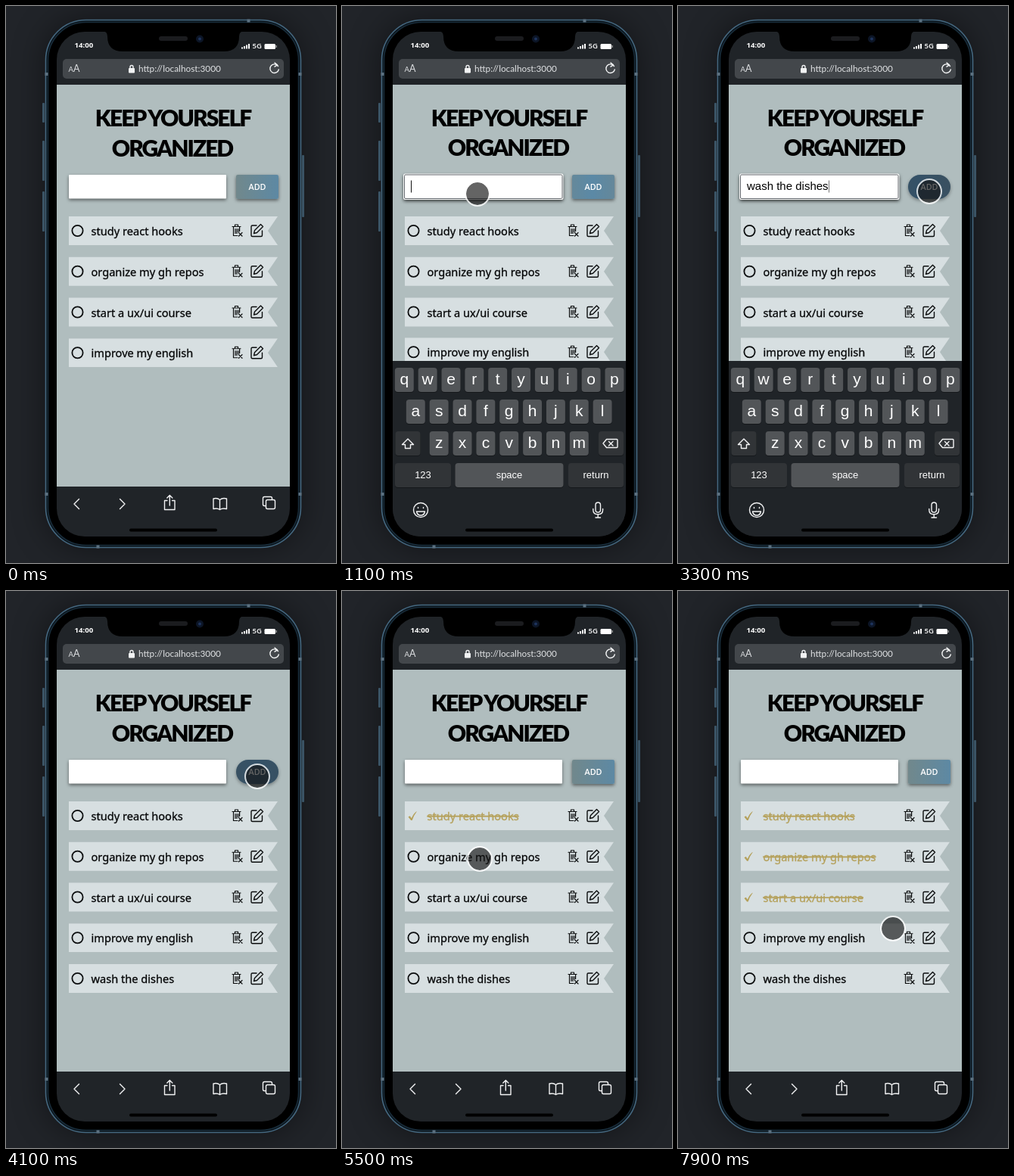
These frames come from a looping animation (436x736 px, 8000 ms). An HTML page:

```html
<!DOCTYPE html>
<html lang="en">
<head>
<meta charset="utf-8">
<title>To-do list on a phone</title>
<style>
html, body { margin: 0; width: 100%; height: 100%; overflow: hidden; background: #212429; }
#stage { position: absolute; left: 0; top: 0; width: 436px; height: 736px; overflow: hidden; }
svg { position: absolute; left: 0; top: 0; }
.line { fill: none; stroke: #f2f3f4; stroke-width: 1.4; stroke-linecap: round; stroke-linejoin: round; }
.ink { fill: none; stroke: #0b0d0e; stroke-linecap: round; stroke-linejoin: round; }
.glow { filter: drop-shadow(0 0 22px rgba(0, 0, 0, .45)); }
.title { font: 900 30px Lato, "Open Sans", sans-serif; letter-spacing: -2px; text-anchor: middle; }
.item { font: 400 14.6px "Noto Sans", sans-serif; fill: #060708; stroke: #060708; stroke-width: .3; }
.done .item { fill: #b4a05a; stroke: #b4a05a; text-decoration: line-through; }
.status { font: 700 9.6px "Open Sans", sans-serif; fill: #fff; }
.url { font: 11.8px Lato, sans-serif; fill: #dfe1e3; }
.typed { font: 15px "Liberation Sans", Arial, sans-serif; }
.key { font: 21px "Liberation Sans", Arial, sans-serif; fill: #fff; text-anchor: middle; }
.word { font-size: 13px; }
.field { filter: drop-shadow(0 2px 2px rgba(0, 0, 0, .5)); }

.nudge { animation: nudge 8s step-end infinite; }
.focus { animation: focus 8s step-end infinite; }
#keys { animation: slide 8s linear infinite; }
#add {
  position: absolute; left: 304px; top: 223px; width: 56px; height: 32px;
  font: 600 10.8px/32px "Open Sans", sans-serif; color: #fff; text-align: center;
  background: linear-gradient(90deg, #71888c, #5b89a6, #6f868c) 0 0 / 220% 100%;
  animation: hue 8s ease-in-out infinite, hover 8s ease-in-out infinite;
}
#pointer {
  position: absolute; left: -17px; top: -17px; width: 30px; height: 30px;
  border: 2px solid rgba(255, 255, 255, .78); border-radius: 50%;
  background: rgba(20, 20, 20, .66); background-clip: padding-box;
  animation: move 8s ease-in-out infinite, show 8s step-end infinite;
}

@keyframes nudge { 0% { transform: none } 7.5% { transform: translateY(-1px) } 46% { transform: none } }
@keyframes focus { 0% { opacity: 0 } 7.5% { opacity: 1 } 45% { opacity: 0 } }
@keyframes slide {
  0%, 7.49% { transform: translateY(236px) }
  7.5% { transform: translateY(9px) }
  9%, 45% { transform: none; animation-timing-function: ease-in }
  48.75%, 100% { transform: translateY(236px) }
}
@keyframes hue {
  0%, 100% { background-position: 0 0 }
  7.5% { background-position: 40% 0 }
  26% { background-position: 90% 0 }
  42% { background-position: 70% 0 }
  66% { background-position: 0 0 }
}
@keyframes hover {
  0%, 38.5%, 55%, 100% { border-radius: 2px; box-shadow: 0 2px 4px rgba(0, 0, 0, .5), inset 0 0 0 30px rgba(25, 42, 60, 0) }
  41%, 51.5% { border-radius: 16px; box-shadow: 0 2px 4px rgba(0, 0, 0, .35), inset 0 0 0 30px rgba(25, 42, 60, .58) }
}
@keyframes move {
  0%, 1.25% { transform: translate(186px, 330px) }
  5%, 17.5% { transform: translate(179px, 248px) }
  17.51%, 33.75% { transform: translate(182px, 248px); animation-timing-function: ease-in }
  36.25% { transform: translate(254px, 268px); animation-timing-function: ease-out }
  38.75%, 51.25% { transform: translate(332px, 245px) }
  56.25%, 62.5% { transform: translate(182px, 300px) }
  68.75%, 77.5% { transform: translate(182px, 354px) }
  81.25%, 93.75% { transform: translate(182px, 406px) }
  98.75%, 100% { transform: translate(284px, 446px) }
}
@keyframes show { 0% { opacity: 0 } 1.25% { opacity: 1 } 17.5% { opacity: 0 } 33.75%, 100% { opacity: 1 } }
</style>
</head>
<body>
<div id="stage">
<svg width="436" height="736" viewBox="0 0 436 736">
  <defs>
    <clipPath id="screen"><rect x="67" y="34" width="308" height="667" rx="37"/></clipPath>
    <clipPath id="inner"><rect x="85" y="225" width="205" height="28"/></clipPath>
    <g id="icons" class="ink">
      <path stroke-width="1.2" d="M299 13.5h11M302.5 13v-2h4v2M300.5 14v11.5h5.5M308.6 14v5.5M303 16.5v6M305 16.5v6M307 16.5v4M307.5 21.5l4.5 4.5m0-4.5l-4.5 4.5"/>
      <path stroke-width="1.4" d="M331 12h-6q-1.600-1.600 1.600v11.500q0 1.500 1.500 1.500h11.500q1.500 0 1.500-1.500v-6" visibility="hidden"/>
      <path stroke-width="1.4" d="M331 12H325.500Q324 12 324 13.500V25Q324 26.500 325.500 26.500H337Q338.500 26.500 338.500 25V19M336.500 10.500L339.500 13.500L331.500 21.500L327.500 22.500L328.500 18.500Z"/>
    </g>
  </defs>

  <!-- phone body -->
  <g fill="#4a6a80">
    <rect x="48" y="128" width="3" height="26" rx="1"/>
    <rect x="48" y="178" width="3" height="53" rx="1"/>
    <rect x="48" y="245" width="3" height="53" rx="1"/>
    <rect x="391" y="197" width="3" height="82" rx="1"/>
  </g>
  <rect class="glow" x="52.500" y="18.500" width="337" height="697" rx="53" fill="#0b141b" stroke="#456880" stroke-width="1.600"/>
  <rect x="55.500" y="21.500" width="331" height="691" rx="50" stroke="#182c3a" stroke-width="1.500"/>
  <path d="M51.500 90h4M386.500 90h4M51.500 645h4M386.500 645h4M320.500 17.500v4M121.500 712.500v4" stroke="#5c7180" stroke-width="4"/>

  <g clip-path="url(#screen)">
    <rect x="67" y="34" width="308" height="667" fill="#202428"/>
    <rect x="67" y="104" width="308" height="531" fill="#b0bdbe"/>

    <!-- address bar -->
    <rect x="75" y="70" width="292" height="26" rx="5" fill="#43474b"/>
    <text class="url" x="82.500" y="87" style="font-size:9.500px">A</text>
    <text class="url" x="89" y="87" style="font-size:12.500px">A</text>
    <rect x="162" y="82" width="8" height="6.500" rx="1" fill="#f2f3f4"/>
    <path class="line" d="M164 82v-1.500a2 2 0 0 1 4 0V82"/>
    <text class="url" x="175" y="87.300">http://localhost:3000</text>
    <path class="line" d="M359.500 79.500A5.800 5.800 0 1 0 360.300 84M355 75l3.500 2.800l-3.500 2.400"/>

    <!-- status bar -->
    <text class="status" x="90.500" y="55.300">14:00</text>
    <text class="status" x="325.500" y="56.300" style="font-weight:600">5G</text>
    <path d="M312 56.500v-2M315 56.500v-3.500M318 56.500v-5M321 56.500v-6.500" stroke="#fff" stroke-width="2"/>
    <rect x="341.500" y="50" width="14.500" height="7" rx="1.500" fill="#fff"/>
    <rect x="356.600" y="52" width="1.200" height="3" fill="#aaa"/>

    <!-- page -->
    <text class="title" x="220.500" y="158.500">KEEP YOURSELF</text>
    <text class="title nudge" x="219.500" y="198.500">ORGANIZED</text>
    <rect class="field" x="83" y="223" width="208" height="31.500" rx="1" fill="#fff"/>
    <g class="focus">
      <rect class="field" x="81" y="221.500" width="211.500" height="34.500" rx="2.500" fill="#fff"/>
      <rect x="82.500" y="223" width="208.500" height="31.500" rx="1.500" fill="none" stroke="#60656a"/>
      <g clip-path="url(#inner)">
        <text class="typed" id="typed" x="91" y="243">wash the dishes</text>
        <g id="cover">
          <rect x="91" y="226" width="210" height="26" fill="#fff"/>
          <rect x="91" y="230.500" width="1" height="16" fill="#111"/>
        </g>
      </g>
    </g>
    <g id="rows"></g>

    <!-- toolbar -->
    <path class="line" d="M96.500 651.500l-6.500 6.500l6.500 6.500M150.500 651.500l6.500 6.500l-6.500 6.500
      M213 653.500h-3.500v12h13.500v-12h-3.500M216.300 660v-13.500m-3.500 3.500l3.500-3.500l3.500 3.500
      M282.500 652.500q-3.500-3-8.500-1.500v13.500q5-1.500 8.500 1q3.500-2.500 9-1v-13.500q-5.500-1.500-9 1.500v13
      M343 660.500h-1.500q-2 0-2-2v-8q0-2 2-2h8q2 0 2 2v1.500"/>
    <rect class="line" x="343.500" y="652.500" width="12" height="12" rx="2"/>

    <g id="keys">
      <rect x="67" y="469" width="308" height="240" fill="#202428"/>
      <g class="line">
        <path d="M87 572l7.500 7.500h-4v5h-7v-5h-4zM349.500 572.500h13.500q1 0 1 1v9q0 1-1 1h-13.500l-4.500-5.500zM352.500 575.500l5.500 5.500m0-5.500l-5.500 5.500"/>
        <circle cx="104" cy="666" r="9.500"/>
        <path d="M98.500 668h11q-1 5-5.500 5t-5.500-5zM100.500 662.500v1M107.500 662.500v1"/>
        <rect x="335" y="656" width="6.500" height="13" rx="3.250"/>
        <path d="M331.800 664.500v1.500q0 5.800 6.400 5.800t6.400-5.800v-1.500M338.200 672v4M335 676h6.500"/>
      </g>
    </g>
    <rect x="163" y="690.500" width="116" height="4" rx="2" fill="#000"/>
  </g>

  <!-- notch -->
  <path d="M128 33H314Q308 34 308 40Q308 60 288 60H154Q134 60 134 40Q134 34 128 33Z"/>
  <rect x="202" y="40" width="38" height="6" rx="3" fill="#1b1c1f"/>
  <circle cx="256" cy="43.500" r="5" fill="#0c1526"/>
  <circle cx="256" cy="43.500" r="2" fill="#1d335c"/>
</svg>
<div id="add">ADD</div>
<div id="pointer"></div>
</div>

<script>
const LOOP = 8000;
const $ = id => document.getElementById(id);

function svg(parent, tag, attrs, text) {
  const el = document.createElementNS('http://www.w3.org/2000/svg', tag);
  for (const k in attrs) el.setAttribute(k, attrs[k]);
  if (text) el.textContent = text;
  return parent.appendChild(el);
}

const play = (el, frames) => el.animate(frames, { duration: LOOP, iterations: Infinity });

function fade(el, at, from, to, span = 150) {
  play(el, [
    { opacity: from, offset: 0 },
    { opacity: from, offset: at / LOOP },
    { opacity: to, offset: (at + span) / LOOP },
    { opacity: to, offset: 1 }
  ]);
}

// To-do rows: label and the time each one is ticked
const items = [
  ['study react hooks', 4600],
  ['organize my gh repos', 5700],
  ['start a ux/ui course', 6850],
  ['improve my english'],
  ['wash the dishes']
];
items.forEach(([label, tick], i) => {
  const row = svg($('rows'), 'g', { transform: `translate(0 ${278 + i * 53.75})` });
  const body = svg(row, 'g', i === 3 ? { class: 'nudge' } : {});
  svg(body, 'path', { d: 'M83 0H359L346 19L359 38H83Z', fill: '#d7dfe1' });
  svg(body, 'use', { href: '#icons' });
  const open = svg(body, 'g', {});
  svg(open, 'circle', { class: 'ink', cx: 94.5, cy: 19, r: 7.1, 'stroke-width': 1.8 });
  svg(open, 'text', { class: 'item', x: 112.5, y: 25 }, label);
  if (tick) {
    const done = svg(body, 'g', { class: 'done' });
    svg(done, 'path', { d: 'M87.500 20.500l2.300-1.300l2 3q2.500-6 6.500-9l.4.4q-4.500 6-6 11.400h-1.600z', fill: '#b4a05a' });
    svg(done, 'text', { class: 'item', x: 112.5, y: 25 }, label);
    fade(open, tick, 1, 0);
    fade(done, tick, 0, 1);
  }
  if (i === 4) fade(row, 3500, 0, 1, 1);
});

// Keyboard
const keys = $('keys');
function key(x, y, w, label, dark, word) {
  const box = { x: x - w / 2, width: w, height: 32, rx: 4 };
  svg(keys, 'rect', { ...box, y: y + 1, fill: '#15181b' });
  svg(keys, 'rect', { ...box, y, fill: dark ? '#313437' : '#525558' });
  if (label) svg(keys, 'text', { class: word ? 'key word' : 'key', x, y: y + (word ? 20 : 22) }, label);
}
[['qwertyuiop', 82.3], ['asdfghjkl', 97.3], ['zxcvbnm', 128.2]].forEach(([row, x], r) =>
  [...row].forEach((c, i) => key(x + i * 30.85, 478 + r * 42, 25, c)));
key(87, 562, 33, '', true);
key(355.5, 562, 33, '', true);
key(107, 604, 74, '123', true, true);
key(221, 604, 143, 'space', false, true);
key(335.5, 604, 73, 'return', true, true);
keys.append(keys.querySelector('.line'));

// Typing: the cover and its caret step along the letters
const typed = $('typed');
const typeTime = n => n <= 11 ? 1330 + n * 70 : 2200 + (n - 11) * 100;
const step = (n, at) => ({
  transform: `translateX(${n ? typed.getSubStringLength(0, n) : 0}px)`,
  offset: at / LOOP,
  easing: 'step-end'
});
const frames = [step(0, 0)];
for (let n = 1; n <= typed.getNumberOfChars(); n++) frames.push(step(n, typeTime(n)));
frames.push(step(0, 3500), step(0, LOOP));
play($('cover'), frames);
</script>
</body>
</html>
```
